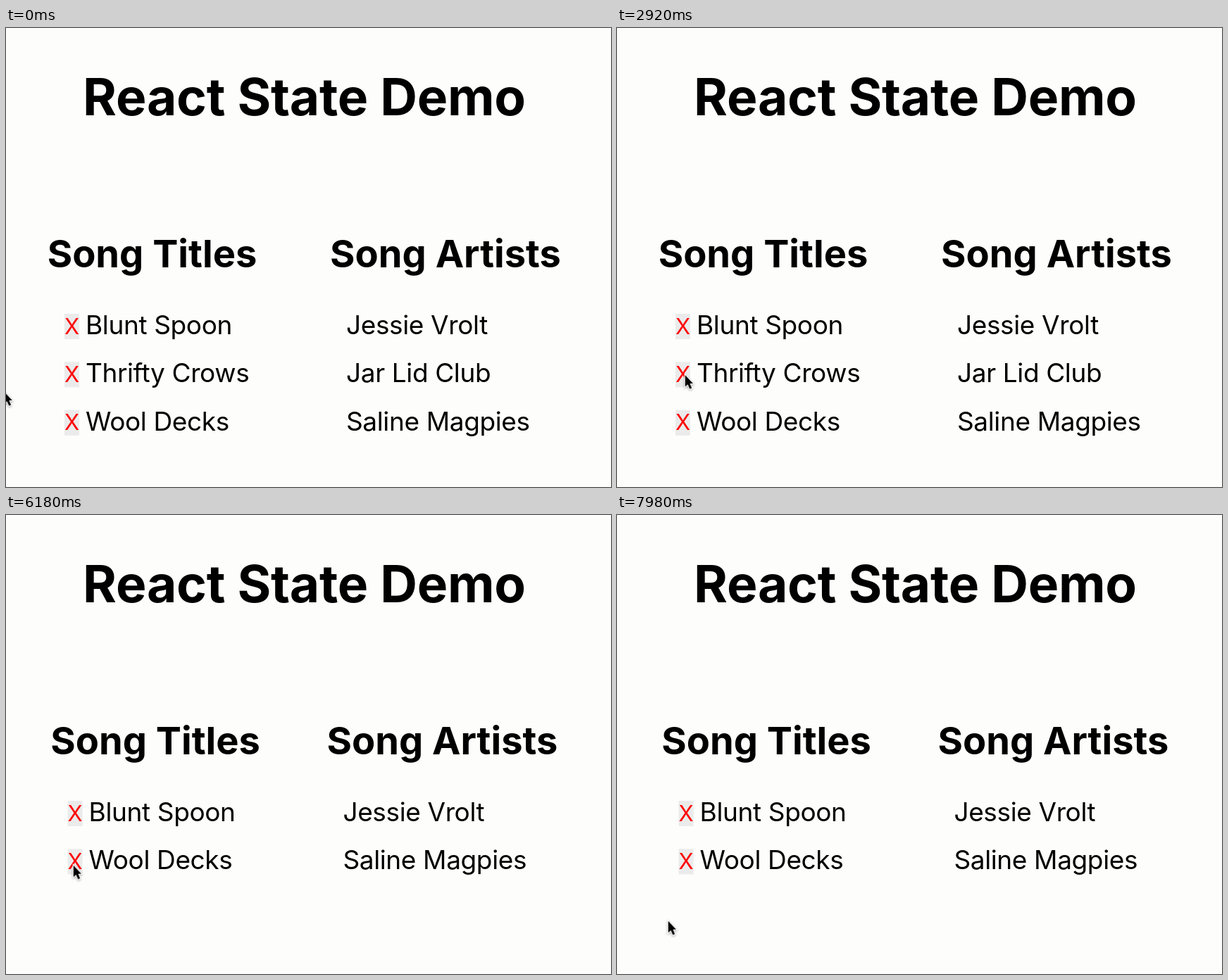
Recreate the animation shown at these times as an HTML page. Size 859 by 652 pixels, loop 8 s.

```html
<!DOCTYPE html>
<html lang="en">
<head>
<meta charset="utf-8">
<title>React State Demo</title>
<style>
  html, body { margin: 0; width: 100%; height: 100%; overflow: hidden; background: #fdfdfb; }
  svg { display: block; width: 100%; height: 100%; }
  text { font-family: Inter, Roboto, sans-serif; font-optical-sizing: none; fill: #000; }
  .title, .heading { font-weight: 700; text-anchor: middle; }
  .title { font-size: 73px; letter-spacing: -.003em; }
  .heading { font-size: 54.2px; }
  .item { font-size: 37px; letter-spacing: -.01em; }
  .x { font-size: 31px; text-anchor: middle; fill: #f00; }
  .button { fill: #ebebeb; }

  .titles, .artists, .removed, .last { animation: 8s step-end infinite; }
  .titles { animation-name: shift-right; }
  .artists { animation-name: shift-left; }
  .removed { animation-name: remove; }
  .last { animation-name: move-up; }
  .cursor { animation: point 8s linear infinite; filter: drop-shadow(0 1.5px 1.5px rgba(0, 0, 0, .35)); }

  /* The second row is deleted at 5340 ms; the columns re-centre. */
  @keyframes shift-right { 0% { transform: none; } 66.75%, 100% { transform: translateX(4.6px); } }
  @keyframes shift-left { 0% { transform: none; } 66.75%, 100% { transform: translateX(-4.6px); } }
  @keyframes remove { 0% { visibility: visible; } 66.75%, 100% { visibility: hidden; } }
  @keyframes move-up {
    0% { transform: translateY(136.8px); }
    66.75%, 100% { transform: translateY(68.4px); }
  }
  @keyframes point {
    0% { transform: translate(-2.5px, 517px); }
    1.9% { transform: translate(18px, 515px); }
    4.4% { transform: translate(66px, 506px); }
    6.25% { transform: translate(91px, 499px); }
    7.5% { transform: translate(97px, 498px); }
    9%, 10.25% { transform: translate(94.6px, 499px); }
    15.5%, 17.75% { transform: translate(96px, 499px); }
    23%, 76% { transform: translate(96.7px, 493px); }
    83.75% { transform: translate(90.7px, 521.5px); }
    86%, 87.25% { transform: translate(87px, 527px); }
    96.5%, 100% { transform: translate(72.7px, 576.7px); }
  }
</style>
</head>
<body>
<svg viewBox="0 0 859 652">
  <defs>
    <g id="delete">
      <rect class="button" x="83" y="406" width="21" height="36"/>
      <text class="x" x="93.5" y="434.5">X</text>
    </g>
  </defs>

  <text class="title" x="423.5" y="124">React State Demo</text>

  <g class="titles">
    <text class="heading" x="207.5" y="340">Song Titles</text>
    <g>
      <use href="#delete"/>
      <text class="item" x="113" y="435">Blunt Spoon</text>
    </g>
    <g class="removed">
      <g transform="translate(0 68.4)">
        <use href="#delete"/>
        <text class="item" x="113" y="435">Thrifty Crows</text>
      </g>
    </g>
    <g class="last">
      <use href="#delete"/>
      <text class="item" x="113" y="435">Wool Decks</text>
    </g>
  </g>

  <g class="artists">
    <text class="heading" x="624" y="340">Song Artists</text>
    <text class="item" x="483" y="435">Jessie Vrolt</text>
    <g class="removed">
      <text class="item" x="483" y="503.4">Jar Lid Club</text>
    </g>
    <g class="last">
      <text class="item" x="483" y="435">Saline Magpies</text>
    </g>
  </g>

  <g class="cursor">
    <path d="M0 0V16.5L3.7 13.2L6.6 19.8L9.4 18.6L6.7 12H11.2Z"
          fill="#000" stroke="#fff" stroke-width="2.2" paint-order="stroke"/>
  </g>
</svg>
</body>
</html>
```
